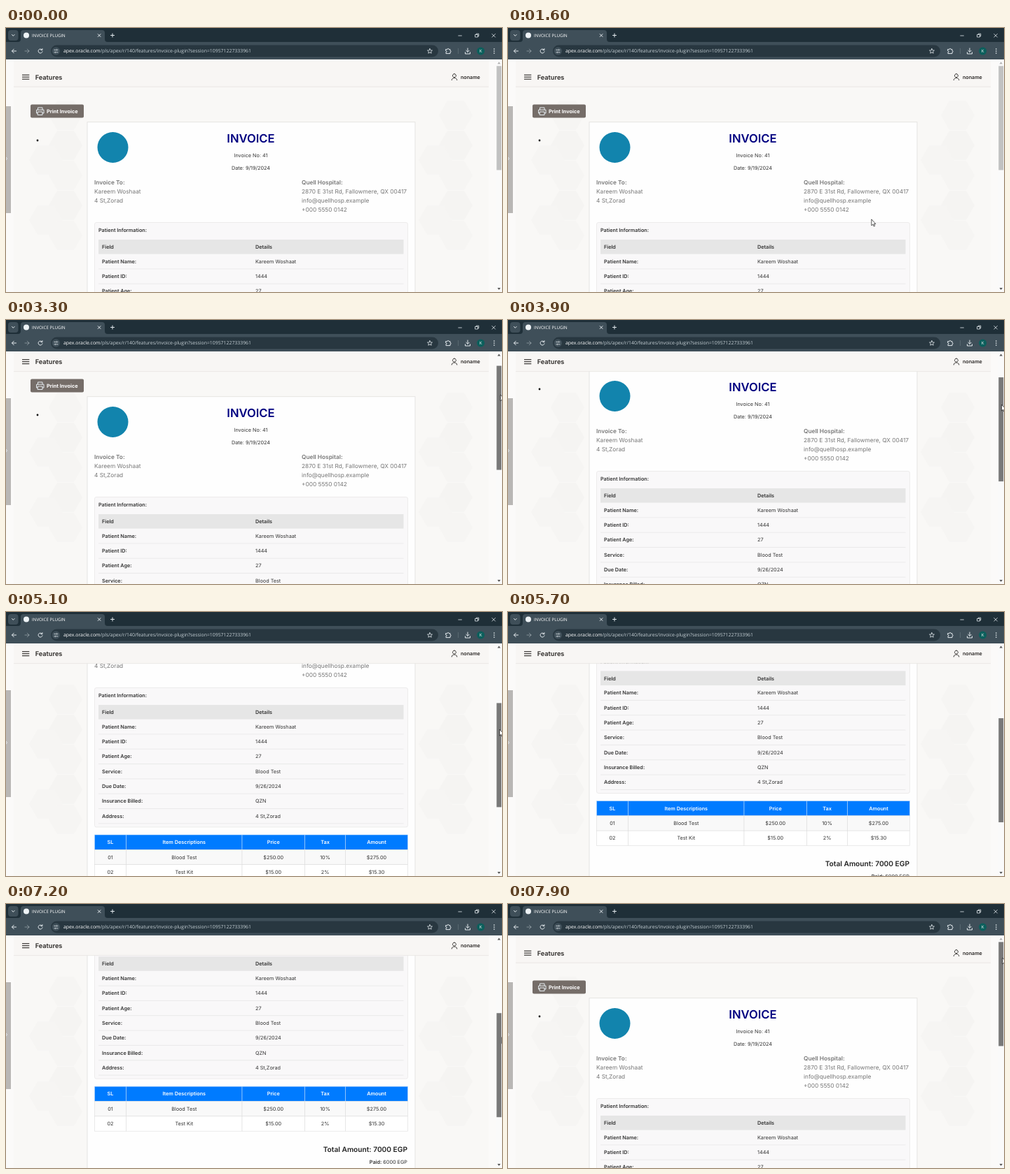
These frames come from a looping animation (708x378 px, 8 s). An HTML page:

```html
<!DOCTYPE html>
<html lang="en">
<head>
<meta charset="utf-8">
<title>Invoice plugin</title>
<style>
  html, body { margin: 0; width: 100%; height: 100%; overflow: hidden; background: #f9f8f6; }
  svg { display: block; width: 708px; height: 378px; }
  text { font-family: Inter, sans-serif; white-space: pre; text-rendering: geometricPrecision; }
  .ui { font-family: "Open Sans", sans-serif; }
  .icon { fill: none; stroke: #e4eaee; stroke-width: 1; stroke-linecap: round; stroke-linejoin: round; }
</style>
</head>
<body>
<svg id="stage" viewBox="0 0 708 378" xmlns="http://www.w3.org/2000/svg"></svg>
<script>
const INK = '#333', DARK = '#2a2725', GREY = '#777';
const LOOP = 8000, STEP = 100, HEADER_TRAVEL = 10.5, THUMB_RATIO = 0.447;

// y is the middle of the capital letters
const text = (x, y, str, size, { fill = INK, weight = 400, anchor = 'start', cls = '' } = {}) =>
  `<text x="${x}" y="${(y + size * 0.36).toFixed(2)}" font-size="${size}" fill="${fill}" font-weight="${weight}" text-anchor="${anchor}" class="${cls}">${str}</text>`;
const rect = (x, y, w, h, fill, extra = '') =>
  `<rect x="${x}" y="${y}" width="${w}" height="${h}" fill="${fill}" ${extra}/>`;
const line = (x1, y1, x2, y2, stroke, width = 0.6) =>
  `<path d="M${x1} ${y1}L${x2} ${y2}" stroke="${stroke}" stroke-width="${width}"/>`;
const circle = (x, y, r, fill) => `<circle cx="${x}" cy="${y}" r="${r}" fill="${fill}"/>`;
const icon = (d, extra = '') => `<path class="icon" d="${d}" ${extra}/>`;

function hexagon(x, y, fill) {
  const points = Array.from({ length: 6 }, (_, i) => {
    const a = i * Math.PI / 3;
    return `${(x + 24 * Math.cos(a)).toFixed(1)},${(y + 24 * Math.sin(a)).toFixed(1)}`;
  });
  return `<polygon points="${points.join(' ')}" fill="${fill}"/>`;
}

function backdrop() {
  let out = rect(0, 45, 708, 333, '#fbfaf9') + rect(11, 45, 678, 333, '#f9f8f6');
  for (let row = 0; row < 5; row++) {
    for (const x of [85, 642]) out += hexagon(x, 125 + row * 43, row % 2 ? '#f5f4f2' : '#f6f5f3');
    for (const x of [57, 613]) if (row % 2) out += hexagon(x, 146 + row * 43, '#f6f5f3');
  }
  return out + rect(0, 112, 7, 153, '#b9b7b5') + icon('M0 185L1.5 187L0 189', 'stroke-width=".7"');
}

function patientPanel() {
  const rows = [
    ['Patient Name:', 'Kareem Woshaat'], ['Patient ID:', '1444'], ['Patient Age:', '27'],
    ['Service:', 'Blood Test'], ['Due Date:', '9/26/2024'],
    ['Insurance Billed:', 'QZN'], ['Address:', '4 St,Zorad']
  ];
  let out = rect(126.5, 278.5, 447, 199.5, '#f9f8f9', 'rx="2.5" stroke="#e7e6e6" stroke-width=".7"')
    + text(132, 289.5, 'Patient Information:', 7.25, { weight: 600 })
    + rect(132, 303, 435.5, 20.6, '#e6e6e6')
    + text(137, 313.4, 'Field', 7.25, { weight: 600 })
    + text(356, 313.4, 'Details', 7.25, { weight: 600 });
  rows.forEach(([field, value], i) => {
    const y = 334.2 + i * 21.33;
    out += text(137, y, field, 7.25, { weight: 600 }) + text(356, y, value, 7.25)
      + line(132, y + 10.7, 567.5, y + 10.7, '#dfdfdf');
  });
  return out;
}

function itemTable() {
  const edges = [126.5, 171.5, 337, 426.5, 484.5, 573.5];
  const rows = [
    ['SL', 'Item Descriptions', 'Price', 'Tax', 'Amount'],
    ['01', 'Blood Test', '$250.00', '10%', '$275.00'],
    ['02', 'Test Kit', '$15.00', '2%', '$15.30']
  ];
  const fills = ['#007bff', '#f9f9f9', '#fff'];
  return rows.map((row, r) => row.map((cell, c) => {
    const y = 489 + r * 21.33, x = edges[c], w = edges[c + 1] - x;
    const style = r ? { anchor: 'middle' } : { anchor: 'middle', weight: 600, fill: '#fff' };
    return rect(x, y, w, 21.33, fills[r], `stroke="${r ? '#ddd' : '#b9d9fb'}" stroke-width=".6"`)
      + text(x + w / 2, y + 10.7, cell, 7.25, style);
  }).join('')).join('');
}

function invoice() {
  const mid = { anchor: 'middle' }, end = { anchor: 'end' };
  const lines = (x, head, rest) => text(x, 221.5, head, 8.3, { fill: GREY, weight: 600 })
    + rest.map((s, i) => text(x, 234.5 + i * 13, s, 8.3, { fill: GREY })).join('');
  const sum = (y, label, value) =>
    text(573, y, `<tspan font-weight="600">${label}</tspan> ${value}`, 7.25, end);
  return rect(35, 109.5, 76, 19, '#756d68', 'rx="2"')
    + icon('M45.5 117V114H52V117M45.5 122H43.5V117.2H54V122H52M45.5 120H52V124.5H45.5Z', 'stroke="#fff"')
    + text(58, 119, 'Print Invoice', 7.35, { fill: '#fff', weight: 700 })
    + circle(45, 161, 1.4, '#111')
    + rect(116, 134.7, 468, 523, '#fefefe', 'stroke="#e3e2e0" stroke-width=".9"')
    + circle(152.5, 171, 22, '#1284ad')
    + text(349.5, 157.8, 'INVOICE', 16.6, { anchor: 'middle', weight: 600, fill: '#000080' })
    + text(349.5, 182, 'Invoice No: 41', 7.25, mid)
    + text(349.5, 200.6, 'Date: 9/19/2024', 7.25, mid)
    + lines(126, 'Invoice To:', ['Kareem Woshaat', '4 St,Zorad'])
    + lines(422, 'Quell Hospital:', ['2870 E 31st Rd, Fallowmere, QX 00417', 'info@quellhosp.example', '+000 5550 0142'])
    + patientPanel() + itemTable()
    + text(573, 579, 'Total Amount: 7000 EGP', 10.2, { anchor: 'end', weight: 600, fill: '#222' })
    + sum(597.2, 'Paid:', '6000 EGP') + sum(616, 'Balance Due:', '1000 EGP');
}

function pageHeader() {
  return rect(11, 34, 678, 50, '#f8f6f4') + line(11, 84.2, 689, 84.2, '#e6e4e1', 0.8)
    + [67.2, 70.2, 73.2].map(y => line(23, y, 33.3, y, DARK, 1.1)).join('')
    + text(41.7, 70.2, 'Features', 9.2, { weight: 600, fill: DARK })
    + icon('M636.2 74.6C636.2 70.4 643.8 70.4 643.8 74.6M640 65.6A2.5 2.5 0 1 1 639.9 65.6', `style="stroke:${DARK};stroke-width:.9"`)
    + text(649, 70.3, 'noname', 7.15, { weight: 600, fill: DARK });
}

function browser() {
  const url = '<tspan fill="#fff">apex.oracle.com</tspan>/pls/apex/r/140/features/invoice-plugin?session=109571227333961';
  return rect(0, 0, 708, 20, '#1f2f38') + rect(0, 20, 708, 25, '#3f4f59')
    + rect(3, 3, 14.5, 15, '#3f4f59', 'rx="4"') + icon('M8.5 9.5L10.3 11.4L12.1 9.5')
    + '<path d="M17 20Q21 20 21 16V7Q21 3 25 3H137Q141 3 141 7V16Q141 20 145 20Z" fill="#3f4f59"/>'
    + circle(29, 10.5, 4, '#eef3f6')
    + text(37, 10.7, 'INVOICE PLUGIN', 6.2, { fill: '#fff', cls: 'ui' })
    + icon('M131.2 8.7L135 12.5M135 8.7L131.2 12.5M152 8V13M149.5 10.5H154.5')
    + icon('M645.8 11H650.4M670 9.5H673.5V13H670ZM671.2 9.3V8.2H674.8V11.8H673.8M693.8 8.5L698.4 13.1M698.4 8.5L693.8 13.1', 'style="stroke-width:.8"')
    + icon('M14.5 33H8.5M11.2 30.2L8.5 33L11.2 35.8')
    + icon('M27 33H33M30.3 30.2L33 33L30.3 35.8', 'opacity=".4"')
    + icon('M51.3 31A3 3 0 1 0 52 33.8M51.9 29.6V31.6H49.9')
    + rect(64, 24.5, 553, 17, '#283740', 'rx="8.5"') + circle(71.3, 33, 5.8, '#3f4f59')
    + icon('M68.8 31.4H71M74 31.4H73.6M68.8 34.8H69.2M71.6 34.8H74M72.3 30.5V32.3M70.3 33.9V35.7', 'style="stroke-width:.8"')
    + text(82, 33, url, 6.9, { fill: '#c3cdd2', cls: 'ui' })
    + icon('M605 29.6L606 31.9L608.5 32.1L606.6 33.8L607.2 36.2L605 34.9L602.8 36.2L603.4 33.8L601.5 32.1L604 31.9Z', 'style="stroke-width:.8"')
    + icon('M628 30.6H630A1.1 1.1 0 0 1 632.2 30.6H634V32.5A1.1 1.1 0 0 1 634 34.7V36.6H628V34.7A1.1 1.1 0 0 0 628 32.5Z')
    + line(645.5, 29, 645.5, 37, '#64737c', 0.7)
    + icon('M659 29V34.2M656.8 32.2L659 34.4L661.2 32.2M655.5 34.8V37H662.5V34.8')
    + circle(677.6, 33, 5.5, '#0c5f5c')
    + text(677.6, 33, 'K', 6, { fill: '#fff', anchor: 'middle', cls: 'ui' })
    + [30, 33, 36].map(y => circle(696.8, y, 0.85, '#e4eaee')).join('');
}

const scrollbar = rect(700, 45, 8, 333, '#fafafa')
  + '<path id="up" d="M701.5 51.5L703.7 48.5L705.9 51.5Z"/>'
  + '<path d="M701.5 372L703.7 375L705.9 372Z" fill="#555"/>'
  + rect(700.3, 54.4, 6.9, 149, '#c1c1c1', 'id="thumb"');
const pointer = '<path id="pointer" d="M0 0V9L2 7.2L3.4 10.2L4.8 9.6L3.5 6.7H6Z" fill="#fff" stroke="#111" stroke-width=".7"/>';

document.getElementById('stage').innerHTML = backdrop()
  + `<g id="page">${invoice()}</g><g id="head">${pageHeader()}</g>`
  + scrollbar + browser() + pointer;

// [time, value...]
const scrollKeys = [
  [0, 0], [2400, 0], [2700, 10.5], [3300, 25], [3900, 62], [4100, 88], [4500, 88],
  [5100, 170], [5300, 170], [5700, 218.5], [6200, 286], [6400, 305.5], [6800, 371],
  [7000, 371], [7500, 13], [7700, 13], [7900, 0]
];
const pointerKeys = [
  [400, 484, 130], [800, 444, 345], [1400, 444, 345], [2100, 706, 96], [2400, 706, 96],
  [2700, 709, 100], [3300, 706, 107], [3900, 704.5, 121], [4100, 704.5, 133], [4500, 704.5, 133],
  [5100, 704.5, 168], [5300, 704.5, 168], [5700, 709, 190], [6800, 709, 258],
  [7000, 709, 258], [7500, 706, 90], [7700, 706, 90], [7900, 706, 77]
];

function valueAt(keys, t) {
  const next = keys.findIndex(k => k[0] > t);
  if (next < 0) return keys[keys.length - 1].slice(1);
  if (next === 0) return keys[0].slice(1);
  const a = keys[next - 1], b = keys[next], p = (t - a[0]) / (b[0] - a[0]);
  return a.slice(1).map((v, i) => v + (b[i + 1] - v) * p);
}

const [page, head, thumb, up, arrow] =
  ['page', 'head', 'thumb', 'up', 'pointer'].map(id => document.getElementById(id));
const move = (el, x, y) => el.setAttribute('transform', `translate(${x} ${y})`);

function draw() {
  const t = Math.floor(performance.now() % LOOP / STEP) * STEP;
  const [scroll] = valueAt(scrollKeys, t);
  move(page, 0, -scroll);
  move(head, 0, -Math.min(scroll, HEADER_TRAVEL));
  move(thumb, 0, scroll * THUMB_RATIO);
  thumb.setAttribute('fill', t < 2100 ? '#c1c1c1' : t < 2500 ? '#a8a8a8' : '#787878');
  up.setAttribute('fill', scroll > 0 ? '#555' : '#b0b0b0');
  move(arrow, ...valueAt(pointerKeys, t));
  arrow.setAttribute('visibility', t < 400 ? 'hidden' : 'visible');
  requestAnimationFrame(draw);
}
draw();
</script>
</body>
</html>
```
